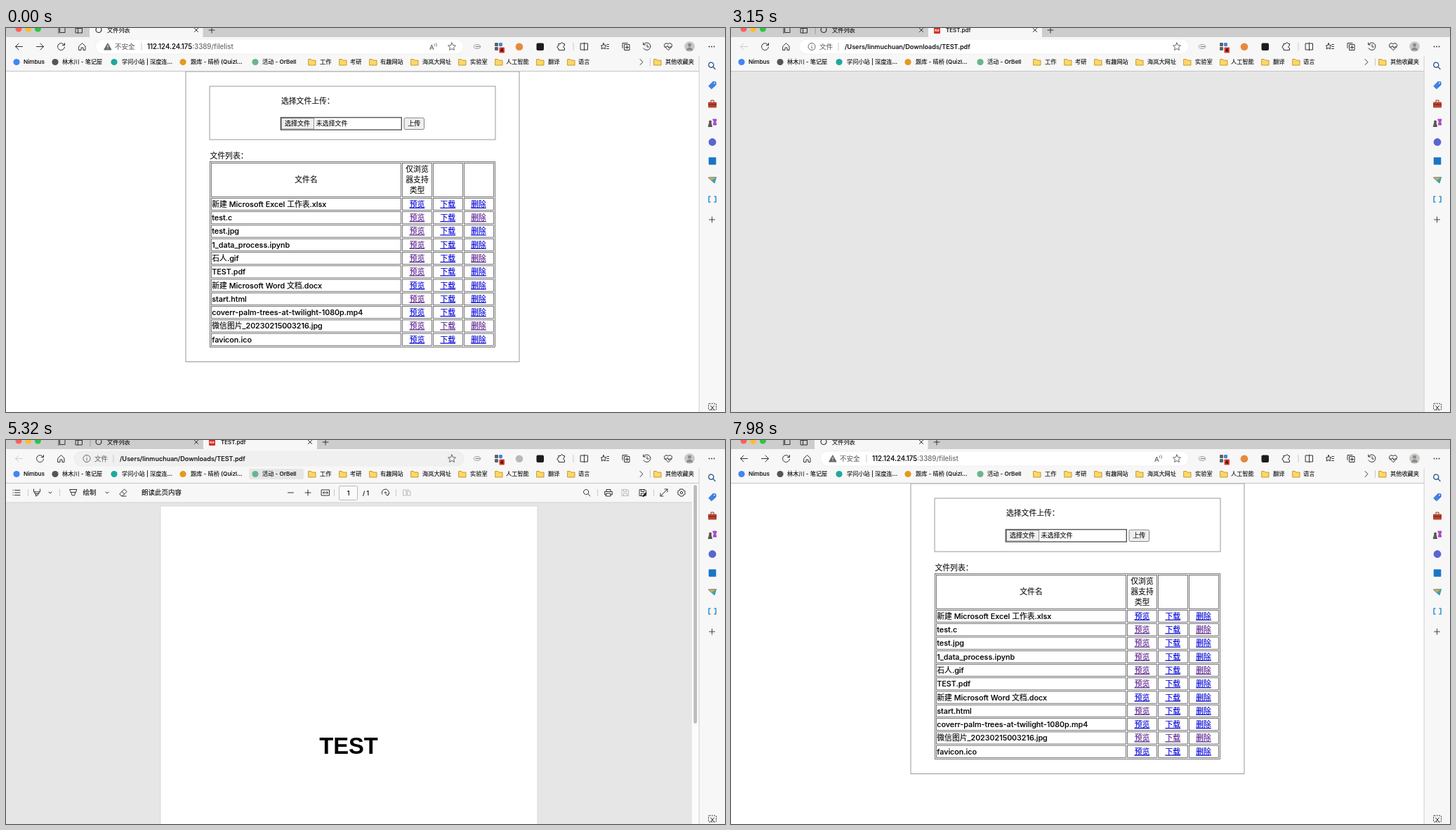
Recreate the animation shown at these times as an HTML page. Size 1024 by 547 pixels, loop 8 s.

```html
<!DOCTYPE html>
<html lang="zh">
<head>
<meta charset="utf-8">
<title>文件列表</title>
<style>
html, body { margin: 0; height: 100%; overflow: hidden; background: #fff; }
svg { display: block; width: 100vw; height: 100vh; font-family: Inter, "Noto Sans CJK SC", "Noto Sans CJK", sans-serif; font-weight: 500; }
</style>
</head>
<body>
<svg id="stage" viewBox="0 0 1024 547"></svg>
<script>
const LOOP = 8000, STEP = 70;
const INK = '#111', BAR = '#f7f7f7', STRIP = '#cdcdcd', BLUE = '#0000d4', VISITED = '#551a8b';

const clamp = v => Math.max(0, Math.min(1, v));
const smooth = v => { v = clamp(v); return v * v * (3 - 2 * v); };
const within = (t, a, b) => t >= a && t < b;

const rect = (x, y, w, h, fill, more = '') =>
  `<rect x="${x}" y="${y}" width="${w}" height="${h}" fill="${fill}" ${more}/>`;
const box = (x, y, w, h, stroke, more = '') => rect(x, y, w, h, 'none', `stroke="${stroke}" ${more}`);
const dot = (x, y, r, fill, more = '') => `<circle cx="${x}" cy="${y}" r="${r}" fill="${fill}" ${more}/>`;
// y is the middle of the line
const text = (x, y, s, size, fill = INK, more = '') =>
  `<text x="${x}" y="${y + size * .36}" font-size="${size}" fill="${fill}" stroke="${fill}" stroke-width=".12" ${more}>${s}</text>`;
const mid = (x, y, s, size, fill, more = '') => text(x, y, s, size, fill, 'text-anchor="middle" ' + more);
const icon = (x, y, d, color = '#333', fill = 'none', width = 1) =>
  `<path transform="translate(${x} ${y})" d="${d}" fill="${fill}" stroke="${color}" stroke-width="${width}" stroke-linejoin="round" stroke-linecap="round"/>`;
const group = (s, more) => `<g ${more}>${s}</g>`;

const P = {
  back: 'M5 0H-5M-.5-4.5L-5 0L-.5 4.5',
  forward: 'M-5 0H5M.5-4.5L5 0L.5 4.5',
  reload: 'M4.6-2A5 5 0 1 0 5 .8M5-5V-1.8H1.8',
  home: 'M-4.5-.5L0-5L4.5-.5V5H1.5V1.5H-1.5V5H-4.5Z',
  star: 'M0-5.5L1.6-1.9L5.5-1.5L2.6 1.2L3.4 5L0 3L-3.4 5L-2.6 1.2L-5.5-1.5L-1.6-1.9Z',
  favs: 'M-2-5L-.8-2L2-1.6L0 .5L.4 3.5L-2 2L-5 3.5L-4.2 .5L-5.5-1.6L-3-2ZM3-3H5.5M3 0H5.5M2.5 3H5.5',
  puzzle: 'M-4-4H-1A1.7 1.7 0 0 1 2.4-4H4.5V-1.5A1.7 1.7 0 0 0 4.5 2V5H-4V2.5A2 2 0 0 1-4-1.5Z',
  split: 'M-5-4.5H5V4.5H-5ZM0-5.5V5.5',
  collect: 'M-2-3H5V5H-2ZM-5 2V-5H2M1.5-1.2V3.2M-.7 1H3.7',
  clock: 'M-5-3A5.3 5.3 0 1 1-5 2.4M-5.3-5.5V-2.6H-2.4M0-2.8V.5H2.5',
  heart: 'M0 5L-5 0A2.9 2.9 0 0 1 0-3.5A2.9 2.9 0 0 1 5 0ZM-5 .5H-2L-.6-1.5L1 2L2 .5H5',
  down: 'M0-5V4M-3.5 .8L0 4.2L3.5 .8M-4.5 6H4.5',
  close: 'M-2.6-2.6L2.6 2.6M2.6-2.6L-2.6 2.6',
  plus: 'M-4 0H4M0-4V4',
  minus: 'M-4 0H4',
  chev: 'M-2-1L0 1L2-1',
  next: 'M-2-4L2 0L-2 4',
  search: 'M1.7 1.7A3.6 3.6 0 1 1 1.8 1.6L5 5',
  folder: 'M-5-4H-1.5L0-2.5H5V4.5H-5Z',
  pin: 'M1-5L5-1L3-.5L.8 2L.3 4L-4-.3L-2-.8L.5-3ZM-2 2L-5 5',
  list: 'M-5-3.5H-4.5M-2.5-3.5H5M-5 0H-4.5M-2.5 0H5M-5 3.5H-4.5M-2.5 3.5H5',
  marker: 'M-4.5-5V-1H4.5V-5M-3-1V1.5H3V-1M-1.5 1.5V5L1.5 3.5V1.5',
  pen: 'M-5-4.5H5L1.3 4H-1.3ZM-3.2-.5H3.2',
  eraser: 'M-5 1.5L1.5-5L5-1.5L-1 4.5H-2.5ZM-2-1.5L1.6 2M-2 5H4',
  fit: 'M-5.5-4H5.5V4H-5.5ZM-3.5 0H3.5M-2-1.5L-3.5 0L-2 1.5M2-1.5L3.5 0L2 1.5',
  rotate: 'M-4.7 2A5 5 0 1 1 3 4M4.8 1.5L3 4L.5 2.5M-1 0A1 1 0 1 0 1 0A1 1 0 1 0-1 0',
  pages: 'M-5-4H-1V4H-5ZM1-2H5V4H1ZM0-4H3',
  print: 'M-3-1.5V-4.5H3V-1.5M-3 3H-5.3V-1.5H5.3V3H3M-3 1H3V5H-3Z',
  save: 'M-4.5-4.5H3L4.5-3V4.5H-4.5ZM-2.5-4.5V-1.5H2V-4.5M-2.5 4.5V1H2.5V4.5',
  full: 'M1-5H5V-1M5-5L-5 5M-5 1V5H-1',
  gear: 'M-2-5L2-5L2.7-3.2L5-2.6L5 2.6L2.7 3.2L2 5H-2L-2.7 3.2L-5 2.6V-2.6L-2.7-3.2ZM-1.7 0A1.7 1.7 0 1 0 1.7 0A1.7 1.7 0 1 0-1.7 0',
  stack: 'M-2-3H5V4H-2ZM-4 5V-2L-1-5',
  side: 'M-4.5-4.5H4.5V4.5H-4.5ZM-1.5-4.5V4.5M-4.5-2H4.5'
};

const dots = (x, y) => [-3.5, 0, 3.5].map(d => dot(x + d, y, .9, '#333')).join('');
const bar = (x, y, h, color = '#c9c9c9') => rect(x, y, 1, h, color);
const pdfIcon = (x, y, h = 9) => rect(x - 4.5, y - h / 2, 9, h, '#d3342c', 'rx="1"') +
  mid(x, y, 'PDF', 3.5, '#fff', 'font-weight="700"');

// name, then visited flags for the three links
const FILES = [
  ['新建 Microsoft Excel 工作表.xlsx', '000'], ['test.c', '101'], ['test.jpg', '100'],
  ['1_data_process.ipynb', '100'], ['石人.gif', '101'], ['TEST.pdf', '100'],
  ['新建 Microsoft Word 文档.docx', '000'], ['start.html', '100'],
  ['coverr-palm-trees-at-twilight-1080p.mp4', '000'],
  ['微信图片_20230215003216.jpg', '111'], ['favicon.ico', '000']
];
const COLS = [[292.5, 270], [564.5, 42], [608.5, 42], [652.5, 42]];

function fileList(t) {
  const S = 10.8, LINE = '#444', THIN = 'stroke-width=".75"';
  const row = (y, h) => COLS.map(([x, w]) => box(x, y, w, h, LINE, THIN)).join('');
  let s = box(256, 62, 475, 413.5, '#777', THIN) + box(290, 83, 407, 76, '#777', THIN) +
    text(392, 104, '选择文件上传：', S) +
    box(391.3, 127.5, 172, 17.5, '#555', 'stroke-width="1.4"') +
    rect(392.5, 128.5, 46, 15.5, '#efefef', 'stroke="#777" stroke-width=".8"') +
    text(397, 136, '选择文件', 9) + text(441.5, 136, '未选择文件', 9) +
    rect(567, 128, 28.5, 16.5, '#efefef', 'rx="2" stroke="#777" stroke-width=".9"') + text(572.2, 136, '上传', 9) +
    text(290.5, 182, '文件列表：', S) +
    box(290.5, 190.5, 406, 264, LINE, THIN) + row(192.5, 48) + mid(427.5, 216, '文件名', S);
  ['仅浏览', '器支持', '类型'].forEach((w, i) => s += mid(585.5, 201 + 15 * i, w, S));
  FILES.forEach(([name, seen], i) => {
    const y = 251 + 19.27 * i;
    s += row(y - 8.6, 17.2) + text(293.3, y, name, S, '#000');
    ['预览', '下载', '删除'].forEach((w, k) => {
      const pressed = i == 5 && k == 1 && within(t, 560, 700);
      s += mid(585.5 + 43.8 * k, y, w, S, pressed ? '#f00' : +seen[k] ? VISITED : BLUE, 'text-decoration="underline"');
    });
  });
  return s;
}

function pdfView(t) {
  if (t < 3150) return '';
  const scroll = 273 * (smooth((t - 6160) / 210) - smooth((t - 6720) / 210));
  let s = rect(0, 62, 987, 485, '#e6e6e6');
  if (t >= 3360) {
    s += rect(220, 94 - scroll, 537, 760, '#fff', 'stroke="#d2d2d2" stroke-width=".8"');
    if (t >= 3500) s += `<text x="488" y="${447 - scroll}" font-size="32.7" font-weight="700" text-anchor="middle" font-family="Liberation Sans, Arial, sans-serif">TEST</text>`;
    s += rect(977, 62, 10, 485, '#fcfcfc') + rect(979.3, 64 + scroll * .656, 4.8, 340, '#bcbcbc', 'rx="2.4"');
  }
  if (t >= 3220) {
    s += rect(0, 62, 977, 27, BAR) + rect(0, 88.5, 977, 1, '#d2d2d2');
    if (within(t, 5040, 5110) || within(t, 6020, 6090) || t >= 7070) s += rect(443, 65, 24, 20.5, '#e3e3e3', 'rx="2"');
    [['list', 15], ['marker', 44], ['chev', 63], ['pen', 96], ['chev', 144], ['eraser', 167], ['minus', 405.5],
     ['plus', 430], ['fit', 455], ['rotate', 540.5], ['search', 827], ['print', 858], ['save', 907],
     ['full', 937], ['gear', 962]].forEach(([n, x]) => s += icon(x, 75, P[n]));
    s += icon(571, 75, P.pages, '#bbb') + icon(882, 75, P.save, '#bbb') + icon(909.5, 78, 'M-2 2L2-2', '#111', 'none', 2);
    [31, 76, 467, 555, 842, 922].forEach(x => s += bar(x, 70, 10));
    s += text(109.5, 75, '绘制', 9.5) + text(193, 75, '朗读此页内容', 9.5) +
      rect(474.5, 65.5, 26, 20, '#fafafa', 'stroke="#bbb" rx="1"') + mid(487.5, 75.5, '1', 9) + text(508, 75.5, '/ 1', 8.6);
  }
  return s;
}

function tabs(t, isPdf, width) {
  let s = rect(0, 0, 1024, 13, STRIP);
  ['#ff5f57', '#febc2e', '#28c840'].forEach((c, i) => s += dot(18 + 13.7 * i, 1, 4.5, c));
  s += icon(79, 2.5, P.stack) + icon(104, 2.5, P.side);
  s += isPdf ? bar(119.5, 0, 9, '#999') : rect(119, -6, 161.5, 20, BAR, 'rx="3"');
  s += dot(132, 2.5, 4, 'none', 'stroke="#333" stroke-width="1.2"') +
    text(144, 3, '文件列表', 8.2) + icon(271, 3, P.close);
  if (width > 0) {
    s += rect(281, -6, width, 20, isPdf ? BAR : STRIP, 'rx="3"');
    if (width > 25) s += pdfIcon(293.5, 3.5);
    if (width > 100) {
      s += text(306, 3, 'TEST.pdf', 8);
      const x = 271 + width;
      if (within(t, 5600, 6020) || within(t, 7420, 7840))
        s += rect(x - 6, -3, 12, 12, t >= 7630 ? '#9a9a9a' : '#d6d6d6', 'rx="2"');
      s += icon(x, 3, P.close);
    }
  }
  return s + icon(293 + width, 3, P.plus);
}

const MARKS = [
  [15, 25, 'Nimbus', '#4285f4'], [70, 80, '林木川 - 笔记屋', '#555'], [154, 165, '学问小站 | 深度连...', '#1fa8a0'],
  [252, 263, '题库 - 晴桥 (Quizl...', '#e59a1c'], [355, 365, '活动 - OrBell', '#68b58c'],
  [436, 447, '工作'], [480, 490, '考研'], [523, 533, '有趣网站'], [582, 593, '海岚大网址'], [650, 661, '实验室'],
  [702, 712, '人工智能'], [761, 772, '翻译'], [805, 815, '语言'], [928, 939, '其他收藏夹']
];

function toolbar(t, isPdf, shift) {
  const left = isPdf ? 97 : 127.5, right = 652 - shift;
  const hover = within(t, 5110, 5390) || within(t, 7140, 7280);
  let s = rect(0, 13, 1024, 49, BAR) + rect(0, 61, 987, 1, '#c4c4c4');
  const nav = isPdf ? ['back', 'reload', 'home'] : ['back', 'forward', 'reload', 'home'];
  nav.forEach((n, i) => s += icon(18.5 + 30 * i, 26.5, P[n], isPdf && !i ? '#ccc' : '#333'));
  s += rect(left, 16, right - left, 21, hover ? '#f0f0f0' : '#fff', 'rx="10.5" stroke="#e8e8e8" stroke-width=".6"');
  if (isPdf) {
    s += dot(115, 26.5, 5, 'none', 'stroke="#666"') + icon(115, 26.5, 'M0-.5V2.5M0-2.6V-2.5', '#666') +
      text(126, 26.5, '文件', 9.5, '#666') + bar(152.5, 21, 11) + text(162, 26.5, '/Users/linmuchuan/Downloads/TEST.pdf', 9.15);
  } else {
    s += icon(145, 26.5, 'M0-4.5L5 4.5H-5Z', '#666', '#666') + icon(145, 26.5, 'M0-1.5V1.2M0 3V3.1', '#fff') +
      text(155, 26.5, '不安全', 9.5, '#666') + bar(192.5, 21, 11) +
      text(201, 26.5, '112.124.24.175<tspan fill="#6b6b6b" stroke="none">:3389/filelist</tspan>', 9.7) +
      text(603 - shift, 27.5, 'A', 9.5, '#666') + icon(611 - shift, 24.5, 'M-1-2Q.5-.5-.5 1M1.5-3Q3.5-.5 2 2', '#666', 'none', .8);
  }
  s += icon(635 - shift, 26.5, P.star, '#555', 'none', .9);

  let g = `<ellipse cx="671" cy="26.5" rx="4.8" ry="2.8" fill="none" stroke="#999"/>` + icon(671, 26.5, 'M-2 0H4', '#777');
  [[696, 21, '#56636e'], [702, 21, '#3f87d8'], [696, 27, '#56636e']].forEach(([x, y, c]) => g += rect(x, y, 5, 5, c, 'rx="1.2"'));
  g += rect(702.5, 27.5, 7.5, 8, '#d93a2b', 'rx="1"') + mid(706.2, 31.6, '4', 6.5, '#000') +
    dot(731, 26.8, 5.3, within(t, 3850, 7840) ? '#b9b9b9' : '#e58a3c') +
    rect(755.5, 21.5, 10.5, 10.5, '#1c1c1c', 'rx="2"') + bar(807.5, 21, 11);
  [['puzzle', 791], ['split', 823.5], ['favs', 853], ['collect', 883], ['clock', 913]].forEach(([n, x]) => g += icon(x, 26.5, P[n]));
  s += group(g, `transform="translate(${-shift} 0)"`);
  if (shift > 20) s += rect(900, 17, 26, 19.5, '#e4e4e4', 'rx="2.5"') + icon(913, 26, P.down);
  s += icon(943, 26.5, P.heart) + dot(973.5, 26.5, 7.3, '#c9c7c5') + dot(973.5, 24.2, 2.5, '#8e8a88') +
    icon(973.5, 30, 'M-4 1.3Q-3.5-2 0-2Q3.5-2 4 1.3Z', '#8e8a88', '#8e8a88') + dots(1005, 26.5);

  if (within(t, 5320, 5390)) s += rect(346, 41, 78, 15, '#e6e6e6', 'rx="3"');
  MARKS.forEach(([x, tx, name, color]) => {
    s += color ? dot(x, 48.5, 4.6, color) : icon(x, 48.5, P.folder, '#b8860b', '#ffd766', .8);
    s += text(tx, 48.5, name, 8.2);
  });
  return s + icon(905, 48.5, P.next) + bar(917, 43, 11);
}

function sidebar() {
  const x = 1006;
  let s = rect(987, 38, 37, 509, BAR) + bar(986.6, 40, 507, '#d0d0d0');
  s += icon(x - 1, 53.5, P.search, '#3a5f8f', 'none', 1.4) +
    icon(x, 81.5, 'M-5 1L1-5L5-4.5V-.5L-1 5Z', '#2d6cd0', '#3d82e6') + dot(x + 3, 78.5, .9, '#fff') +
    rect(x - 6, 105.5, 12, 8, '#b8432f', 'rx="1"') + icon(x, 105, 'M-2 0V-2H2V0', '#8b2f22') + rect(x - 6, 108.5, 12, 1, '#6e2419') +
    dot(x - 3, 133.5, 2, '#555') + icon(x - 3, 138, 'M-1-3H1L2.5 2.5H-2.5Z', '#555', '#555') +
    icon(x + 3.5, 134, 'M-2.5-4H2.5L1.2 0L2.2 4H-2.2L-1.2 0Z', '#a53cc4', '#b04bd0') +
    dot(x, 162.5, 5.4, '#5966cf') + rect(x - 5.3, 184.2, 10.6, 10.6, '#1976c5', 'rx="1"') +
    icon(x, 216.5, 'M-5.5-3.5L5.5-4L3 4.5L-1 1Z', '#2f93b5', '#38a5c4') + icon(x, 216.5, 'M-5-3L5-3.7L-1 .5Z', '#d39b45', '#e0a64e', .6) +
    icon(x, 244, 'M-3-4H-5V4H-3M3-4H5V4H3', '#3b95cf', 'none', 1.6) + icon(x - .5, 273, P.plus, '#444') +
    box(x - 5.5, 535, 11, 9, '#333', 'stroke-dasharray="2 1.3" rx="1"') + icon(x, 540.5, 'M-2.5-2.5L2.5 3.5M2.5-2.5L-2.5 3.5');
  return s;
}

function downloads(t) {
  const alpha = clamp((t - 770) / 280);
  if (!alpha || t >= 2450) return '';
  const LINK = '#1168b8', PALE = '#767676';
  let s = [12, 9, 6, 3].map(d => rect(683 - d / 2, 38, 243 + d, 153 + d * .7, '#000', `opacity=".035" rx="${4 + d / 2}"`)).join('') +
    rect(683, 37, 243.5, 153.5, '#fff', 'rx="4" stroke="#ccc" stroke-width=".6"') +
    text(694, 50, '下载', 9.3, INK, 'font-weight="600"') +
    icon(844, 50, P.folder) + icon(865, 49.5, P.search) + dots(887, 50) + icon(909, 50, P.pin) + rect(683, 64, 243, .8, '#e5e5e5');
  [75.5, 141.5].forEach(y => s += rect(695.5, y, 6.5, 10, '#e4e4e4') + pdfIcon(698.5, y + 5.5, 5) + text(710, y, 'TEST.pdf', 8) +
    text(710, y + 11, '打开文件', 8.1, LINK, 'text-decoration="underline"'));
  s += rect(695.5, 109.5, 6, 8, '#eee') + dot(698.5, 114, 1.6, '#777') +
    text(710, 108.5, '石人.gif', 8, '#555', 'text-decoration="line-through"') + text(710, 119.5, '已删除', 8, PALE) +
    text(694, 177.5, '查看更多', 9.3, LINK);
  return group(s, `opacity="${alpha}"`);
}

function scene(t) {
  const isPdf = within(t, 2450, 7840);
  const width = 162 * (smooth((t - 2380) / 420) - clamp((t - 7840) / 140));
  const shift = t < 2450 ? 30 * smooth((t - 630) / 210) : 0;
  return rect(0, 0, 1024, 547, '#fff') + (isPdf ? pdfView(t) : fileList(t)) +
    toolbar(t, isPdf, shift) + tabs(t, isPdf, width) + sidebar() + downloads(t);
}

const stage = document.getElementById('stage');
let shown = -1;
function draw() {
  const t = Math.floor(performance.now() % LOOP / STEP) * STEP;
  if (t !== shown) stage.innerHTML = scene(shown = t);
  requestAnimationFrame(draw);
}
draw();
</script>
</body>
</html>
```
